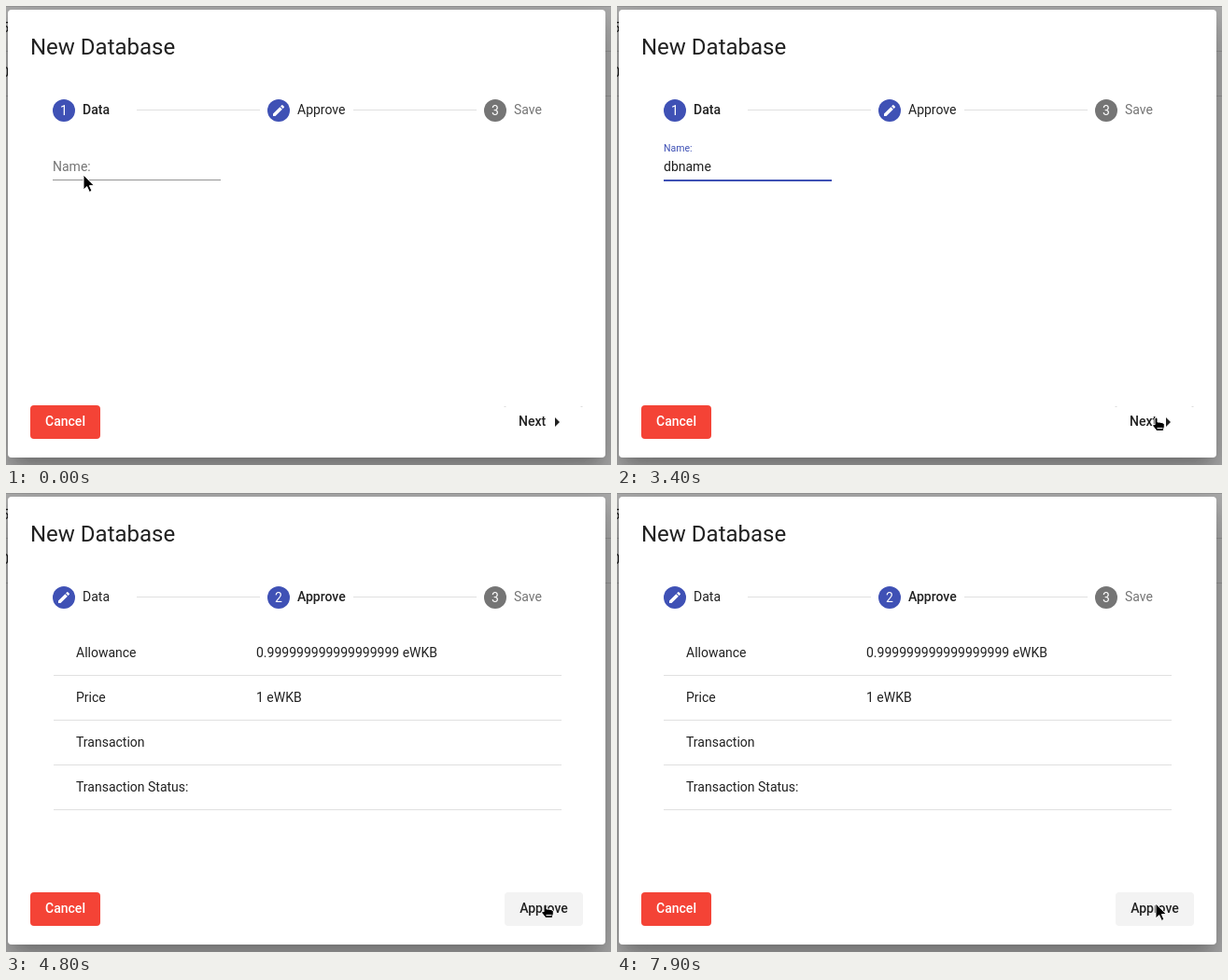
An HTML page for the animation above (8000 ms loop, 648x492 px).

```html
<!DOCTYPE html>
<html lang="en">
<head>
<meta charset="utf-8">
<title>New Database</title>
<style>
  html, body { margin: 0; width: 100%; height: 100%; overflow: hidden; background: #adadad; }
  body { position: relative; font: 14px Roboto, sans-serif; }
  .rule { position: absolute; left: 0; width: 648px; height: 1px; background: #989898; }
  .cell { position: absolute; right: calc(100% - 3px); line-height: 16px; color: #161616; }
  .dialog {
    position: absolute; left: 2px; top: 4px; width: 640px; height: 480px;
    border-radius: 4px; background: #fff;
    box-shadow: 0 11px 15px -7px rgba(0,0,0,.2), 0 24px 38px 3px rgba(0,0,0,.14), 0 9px 46px 8px rgba(0,0,0,.12);
  }
  svg { position: absolute; left: 0; top: 0; }
  text { fill: #212121; white-space: pre; }
  .bold { font-weight: 500; }
  .white { fill: #fff; }
  .mid { text-anchor: middle; }
  .muted { fill: #757575; }
  .line { fill: #e0e0e0; }
  .accent { fill: #3f51b5; }
</style>
</head>
<body>
<div class="rule" style="top:0"></div>
<div class="rule" style="top:48px"></div>
<div class="rule" style="top:96px"></div>
<div class="cell" style="top:15px">5</div>
<div class="cell" style="top:63px">0</div>
<div class="dialog"></div>

<svg width="648" height="492" viewBox="0 0 648 492">
  <defs>
    <path id="pencil" class="white" transform="scale(.66667)" d="M3 17.25V21h3.75L17.81 9.94l-3.75-3.75L3 17.25zM20.71 7.04a1 1 0 0 0 0-1.41l-2.34-2.34a1 1 0 0 0-1.41 0l-1.83 1.83 3.75 3.75 1.83-1.83z"/>
    <clipPath id="page"><rect x="26" y="140" width="592" height="260"/></clipPath>
    <clipPath id="face"><rect x="534" y="428" width="84" height="36" rx="4"/></clipPath>
  </defs>

  <text x="26" y="52" font-size="24">New Database</text>

  <rect class="line" x="140" y="111" width="132" height="1"/>
  <rect class="line" x="372" y="111" width="132" height="1"/>
  <circle class="accent" cx="62" cy="112" r="12"/>
  <circle class="accent" cx="292" cy="112" r="12"/>
  <circle class="muted" cx="524" cy="112" r="12"/>
  <text class="white mid" x="524" y="117">3</text>
  <text class="muted" x="544" y="116">Save</text>
  <g id="first">
    <text class="white mid" x="62" y="117">1</text>
    <text class="bold" x="82" y="116">Data</text>
    <use href="#pencil" x="0" y="0" transform="translate(284 104)"/>
    <text x="312" y="116">Approve</text>
  </g>
  <g id="second">
    <use href="#pencil" transform="translate(54 104)"/>
    <text x="82" y="116">Data</text>
    <text class="white mid" x="292" y="117">2</text>
    <text class="bold" x="312" y="116">Approve</text>
  </g>

  <g id="form">
    <text id="label">Name:</text>
    <rect x="50" y="186" width="180" height="1" fill="#949494"/>
    <rect id="bar" class="accent" y="186" height="2"/>
    <text id="value" x="50" y="177"></text>
    <rect id="caret" class="accent" y="165" width="1" height="16"/>
  </g>

  <g clip-path="url(#page)"><g id="table"></g></g>

  <rect x="26" y="428" width="75" height="36" rx="4" fill="#f44336"/>
  <text class="bold white mid" x="63.5" y="450">Cancel</text>

  <rect id="button" x="534" y="428" width="84" height="36" rx="4"/>
  <g clip-path="url(#face)"><circle id="ripple" cx="577" cy="446"/></g>
  <g id="next">
    <path d="M533.5 429.5h2M615.5 429.5h2" stroke="#ddd" fill="none"/>
    <text class="bold" x="549" y="450">Next</text>
    <path d="M588 441l5 5-5 5z" fill="#212121"/>
  </g>
  <text id="approve" class="bold mid" x="576" y="450">Approve</text>

  <g id="arrow">
    <path d="M0 0V16L3.7 12.6 6.4 18.4 9 17.2 6.4 11.6H11.4Z" fill="#000" stroke="#fff" stroke-width="1" stroke-linejoin="round"/>
  </g>
  <g id="beam" fill="none">
    <path d="M-3.5-6.5H-1L0-6 1-6.5H3.5M0-6V6M-3.5 6.5H-1L0 6 1 6.5H3.5" stroke="#fff" stroke-width="3"/>
    <path d="M-3.5-6.5H-1L0-6 1-6.5H3.5M0-6V6M-3.5 6.5H-1L0 6 1 6.5H3.5" stroke="#000" stroke-width="1.2"/>
  </g>
  <g id="hand">
    <path d="M3 2Q4.5 .3 6 2V6H8L10 6.4 12 7 13.3 8V11L12 15.5H5L1 10.3Q.2 8.2 2 8.3L3 9Z" fill="#000" stroke="#fff" stroke-width="1" stroke-linejoin="round"/>
    <path d="M5.5 12.5H11.5" stroke="#fff" fill="none"/>
  </g>
</svg>

<script>
const LOOP = 8000, STEP = 100, SLIDE = 4330;
const el = {};
document.querySelectorAll('svg [id]').forEach(n => el[n.id] = n);

const rows = [
  ['Allowance', '0.999999999999999999 eWKB'],
  ['Price', '1 eWKB'],
  ['Transaction', ''],
  ['Transaction Status:', '']
];
el.table.innerHTML = rows.map(([name, value], i) => {
  const y = 176 + 48 * i;
  return `<text x="74" y="${y}">${name}</text><text x="267" y="${y}">${value}</text>` +
    `<rect class="line" x="50" y="${y + 19}" width="544" height="1"/>`;
}).join('');

// Each row starts with its time in ms.
const typed = [[0, 0], [1300, 1], [1700, 2], [2000, 3], [2300, 4], [2400, 5], [3000, 6]];
const focus = [[0, 0, 0], [800, .3, .6], [900, .81, .92], [1100, 1, 1]]; // label lift, bar width
const ripples = [[0, 0, 0], [4200, 19, .1], [4300, 38, .08], [4400, 0, 0],
  [6300, 19, .1], [6400, 37, .1], [6500, 47, .08], [6600, 47, .04], [6900, 0, 0]];
const pointer = [[0, 'arrow', 83, 181], [400, 'beam', 88, 179], [500, 'beam', 92, 176],
  [600, 'beam', 90, 176], [3100, 'arrow'], [3400, 'hand', 573, 440], [7900, 'arrow', 577, 440]];

const at = (table, t) => table.findLast(row => row[0] <= t);
const show = (node, on) => node.setAttribute('visibility', on ? 'visible' : 'hidden');
const set = (node, attrs) => { for (const k in attrs) node.setAttribute(k, attrs[k]); };
const clamp = v => Math.min(1, Math.max(0, v));
const mix = (a, b, p) => a + (b - a) * p;

// cubic-bezier(.35, 0, .25, 1)
function ease(x) {
  let lo = 0, hi = 1, s = .5;
  for (let i = 0; i < 24; i++) {
    s = (lo + hi) / 2;
    const q = 1 - s, bx = 3 * q * q * s * .35 + 3 * q * s * s * .25 + s * s * s;
    if (bx < x) lo = s; else hi = s;
  }
  return s * s * (3 - 2 * s);
}

function drawForm(t) {
  const [, lift, width] = at(focus, t);
  set(el.label, {
    transform: `translate(50 ${mix(177, 156, lift)}) scale(${mix(1, .75, lift)})`,
    style: `fill:${lift ? '#3f51b5' : '#757575'}`
  });
  set(el.bar, { x: 140 - 90 * width, width: 180 * width, opacity: width });
  const text = 'dbname'.slice(0, at(typed, t)[1]);
  el.value.textContent = text;
  set(el.caret, { x: Math.round(50 + (text ? el.value.getComputedTextLength() : 0)) });
  show(el.caret, t >= 900 && t < 3300);
}

function drawPointer(t) {
  let [, kind, x, y] = at(pointer, t);
  if (x === undefined) {
    const p = (t - 3000) / 400;
    x = mix(90, 577, p);
    y = mix(176, 440, p);
  }
  for (const k of ['arrow', 'beam', 'hand']) show(el[k], k === kind);
  set(el[kind], { transform: `translate(${x} ${y})` });
}

function draw(t) {
  const approving = t >= SLIDE;
  for (const k of ['first', 'form', 'next']) show(el[k], !approving);
  for (const k of ['second', 'table', 'approve', 'button']) show(el[k], approving);
  drawForm(t);
  if (approving) show(el.caret, false);

  const slide = ease(clamp((t - SLIDE) / 500));
  set(el.table, { transform: `translate(${Math.round(544 * (1 - slide))} 0)` });
  const shade = Math.round(mix(252, 243, clamp((t - SLIDE) / 300)));
  set(el.button, { fill: `rgb(${shade},${shade},${shade})` });

  const [, r, alpha] = at(ripples, t);
  set(el.ripple, { r, opacity: alpha });
  drawPointer(t);
}

function tick() {
  draw(Math.floor(performance.now() % LOOP / STEP) * STEP);
  requestAnimationFrame(tick);
}
tick();
</script>
</body>
</html>
```
